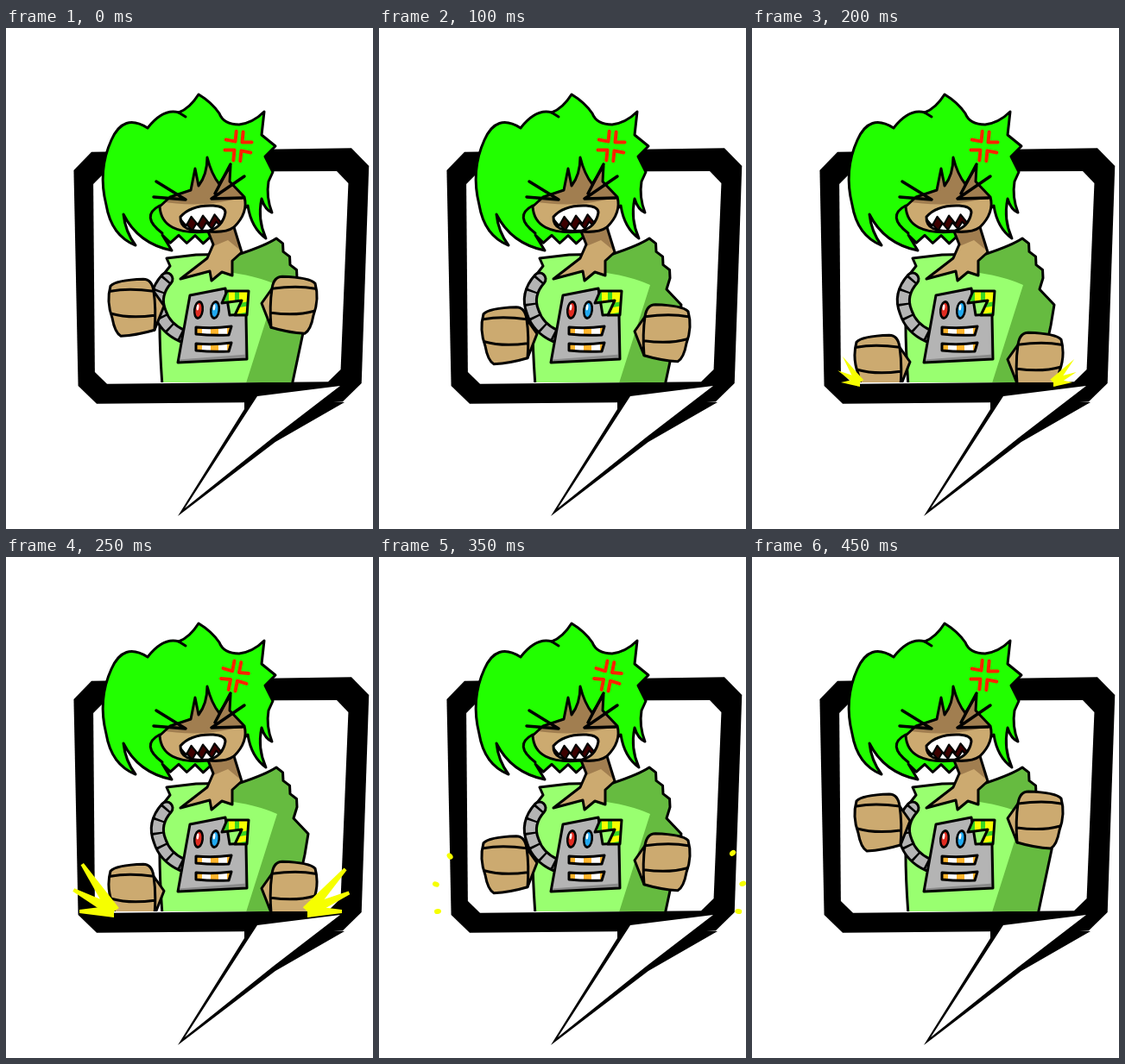
An HTML page with a canvas for the animation above (500 ms loop, 425 by 581 pixels).

```html
<!DOCTYPE html>
<html lang="en">
<head>
<meta charset="utf-8">
<title>Angry fists</title>
<style>
html, body { margin: 0; width: 100%; height: 100%; overflow: hidden; background: #fff; }
canvas { display: block; }
</style>
</head>
<body>
<canvas id="stage" width="425" height="581"></canvas>
<script>
const ctx = document.getElementById('stage').getContext('2d');
const STEP = 50, STEPS = 10, FLOOR = 411;
const C = {
  hair: '#22ff00', skin: '#ccaa70', skinDark: '#a17e50', shirt: '#99ff70', shirtDark: '#66bb40',
  metal: '#b4b4b4', metalDark: '#8b8b8b', red: '#ff2200', yellow: '#f6ff00', orange: '#ffb52c', mouth: '#3c0000'
};
ctx.lineJoin = ctx.lineCap = 'round';

function fill(d, color) {
  ctx.fillStyle = color;
  ctx.fill(new Path2D(d));
}
function line(d, width = 3, color = '#000') {
  ctx.strokeStyle = color;
  ctx.lineWidth = width;
  ctx.stroke(new Path2D(d));
}
function dashes(d, width, color, on, off) {
  ctx.save();
  ctx.lineCap = 'butt';
  ctx.setLineDash([on, off]);
  line(d, width, color);
  ctx.restore();
}
function clipped(d, draw) {
  ctx.save();
  ctx.clip(new Path2D(d));
  draw();
  ctx.restore();
}
// Fills a shape, paints details inside it, then outlines it.
function shape(d, color, details, width) {
  fill(d, color);
  if (details) clipped(d, details);
  line(d, width);
}
function ellipse(x, y, rx, ry, color) {
  ctx.fillStyle = color;
  ctx.beginPath();
  ctx.ellipse(x, y, rx, ry, .12, 0, 7);
  ctx.fill();
}
// Sawtooth between two points; a positive depth turns right of the direction of travel.
function zigzag(x0, y0, x1, y1, teeth, depth) {
  const dx = x1 - x0, dy = y1 - y0, length = Math.hypot(dx, dy);
  let d = '';
  for (let i = 0; i <= teeth * 2; i++) {
    const t = i / teeth / 2, out = i % 2 * depth / length;
    d += `L${x0 + dx * t - dy * out} ${y0 + dy * t + dx * out}`;
  }
  return d;
}
// Polygon whose corners are all cut off at the same distance.
function bevel(corners, cut) {
  const toward = ([x, y], [u, v]) => {
    const k = cut / Math.hypot(u - x, v - y);
    return [x + (u - x) * k, y + (v - y) * k];
  };
  const n = corners.length;
  return 'M' + corners.flatMap((p, i) =>
    [toward(p, corners[(i + n - 1) % n]), toward(p, corners[(i + 1) % n])]).join('L') + 'Z';
}

function bubble() {
  fill(bevel([[78, 144], [421, 139], [411, 433], [84, 436]], 21), '#000');
  fill('M276 425V442L199 566 312 480 392 434Z', '#000');
  fill(bevel([[101, 167], [397, 166], [387, 410], [103, 413]], 14), '#fff');
  fill('M291 427L387 415 309 475 207 557Z', '#fff');
}

function shirt(armsUp) {
  const sleeve = armsUp ? 'L349 330' : 'L333 303 350 321 346 345';
  const outline = 'M220 263L186 267 190 276 183 285Q174 320 181 415H331' +
    [...sleeve.matchAll(/(\d+) (\d+)/g)].reverse().map(m => 'L' + m[0]).join('') +
    zigzag(337, 290, 313, 244, 3, 4) + 'Q301 252 271 262Z';
  shape(outline, C.shirt, () =>
    fill('M250 282Q290 287 314 298L277 415H370V240H250Z', C.shirtDark));
}

function tube() {
  const path = 'M186 291Q170 309 178 329Q184 348 204 357';
  line(path, 17);
  line(path, 11, C.metal);
  dashes(path, 14, '#000', 2.5, 13);
}

function robotPlate() {
  shape('M213 310L254 302 259 333 278 332 279 384 199 388Z', C.metal, () => line('M200 388L280 382V332', 7, C.metalDark));
  const panel = 'M256 305H281L279 333H265L273 316 250 319Z';
  shape(panel, C.yellow, () => dashes('M253 312H270L274 335', 18, '#38d522', 5, 7));
  for (const [x, color] of [[223, '#e02b20'], [242, '#20a8ef']]) {
    ellipse(x, 327, 6, 11, '#000');
    ellipse(x, 327, 3.4, 8, color);
    ellipse(x - 1, 324, 1.4, 3.4, '#fff');
  }
  for (const y of [347, 366]) {
    const slot = `M220 ${y}Q240 ${y + 2} 261 ${y - 1}L258 ${y + 9}Q239 ${y + 10} 220 ${y + 8}Z`;
    shape(slot, C.orange, () => dashes(`M227 ${y + 5}H262`, 12, '#fff', 10, 9));
  }
}

function hair() {
  shape('M223 77Q213 93 200 98Q182 93 164 116Q136 98 122 130Q106 165 116 205Q122 241 150 252' +
    'Q138 236 136 216Q153 250 192 258' + zigzag(181, 240, 238, 241, 3, 9) +
    'L280 206Q284 232 301 244Q291 222 296 198Q300 211 308 214Q301 196 304 178' +
    'L309 167 300 149 312 137 296 124 299 97Q286 110 270 112Q252 112 247 99Q238 86 223 77Z', C.hair);
  line('M200 98L208 103M178 206Q155 218 181 238');
}

function head() {
  const skin = 'M178 207L190 196 214 188 219 163 223 183Q233 170 233 150Q238 170 247 181L260 160 259 178 276 196' +
    'Q281 214 264 231L273 260 262 270V287L250 283 238 293 236 282 202 291 233 267 240 251 234 236Q180 241 178 207Z';
  shape(skin, C.skin, () => {
    fill('M170 199Q225 212 282 194V140H170Z', C.skinDark);
    fill('M230 234H270L274 260 257 246 238 254Z', C.skinDark);
  });
  line('M234 236Q254 238 264 231');
  line('M174 178L208 199 171 196M276 172L238 198 274 197M242 192L260 158', 3.5);

  shape('M202 219Q214 205 240 206Q254 207 254 214Q251 231 235 235Q201 238 202 219Z', C.mouth, () => {
    shape('M202 200' + zigzag(201, 220, 255, 215, 4, 10) + 'L255 200Z', '#fff', null, 2);
    shape('M204 240' + zigzag(204, 236, 250, 232, 4, -8) + 'L250 240Z', '#fff', null, 2);
  });
}

// Four bent strokes around a centre.
function angerMark(shifted) {
  ctx.save();
  ctx.translate(...shifted ? [265, 138] : [269, 137]);
  ctx.rotate(shifted ? .2 : .1);
  for (const sx of [-1, 1])
    for (const sy of [-1, 1])
      line(`M${sx * 15} ${sy * 6}L${sx * 4} ${sy * 5}V${sy * 17}`, 4, C.red);
  ctx.restore();
}

function fist() {
  shape('M121 348Q127 341 159 340Q169 340 171 354L183 371 172 399Q152 405 133 406Q126 402 123 385Q116 366 121 348Z', C.skin);
  line('M121 354Q142 350 171 354Q174 374 172 399M122 380Q143 386 172 382');
}

function fists(offset) {
  clipped(`M0 0H425V${FLOOR}H0Z`, () => {
    ctx.translate(0, offset);
    fist();
    ctx.translate(479, -3);
    ctx.scale(-1, 1);
    fist();
  });
}

// Each hit throws three rays to either side; they stretch, come loose and end as dots.
function impact(step) {
  if (step < 4 || step > 7) return;
  for (const { x, dir, reach, fan } of [
    { x: 125, dir: -1, reach: 1, fan: .49 },
    { x: 349, dir: 1, reach: 1.18, fan: .42 }
  ]) {
    ctx.save();
    ctx.translate(x, FLOOR);
    ctx.scale(dir, 1);
    for (let i = 0; i < 3; i++) {
      ctx.save();
      ctx.rotate(-i * fan);
      const tip = (57 + 10 * i) * reach, length = 40 + 13 * i;
      if (step === 4) fill(`M0 -5L${length * .55} 0 0 5Z`, C.yellow);
      if (step === 5) fill(`M0 -7L${length} -2V2L0 7Z`, C.yellow);
      if (step === 6) fill(`M${tip} -2V2L${tip - 20 - 9 * i} 4V-4Z`, C.yellow);
      if (step === 7) ellipse(tip, 0, 4, 3, C.yellow);
      ctx.restore();
    }
    ctx.restore();
  }
}

// Fists swing evenly between top and floor, resting one extra step at the floor.
function fistOffset(step) {
  const phase = (step + 1) % STEPS;
  return -65 + 16.25 * Math.min(phase, STEPS + 1 - phase);
}

function draw(step) {
  const offset = fistOffset(step);
  ctx.fillStyle = '#fff';
  ctx.fillRect(0, 0, 425, 581);
  bubble();
  clipped(`M0 0H425V${FLOOR}H0Z`, () => shirt(offset < -30));
  tube();
  robotPlate();
  hair();
  head();
  angerMark(step % 2 === 1 && step < STEPS - 1);
  fists(offset);
  impact(step);
}

const start = performance.now();
function tick() {
  draw(Math.floor((performance.now() - start) / STEP) % STEPS);
  requestAnimationFrame(tick);
}
tick();
</script>
</body>
</html>
```
